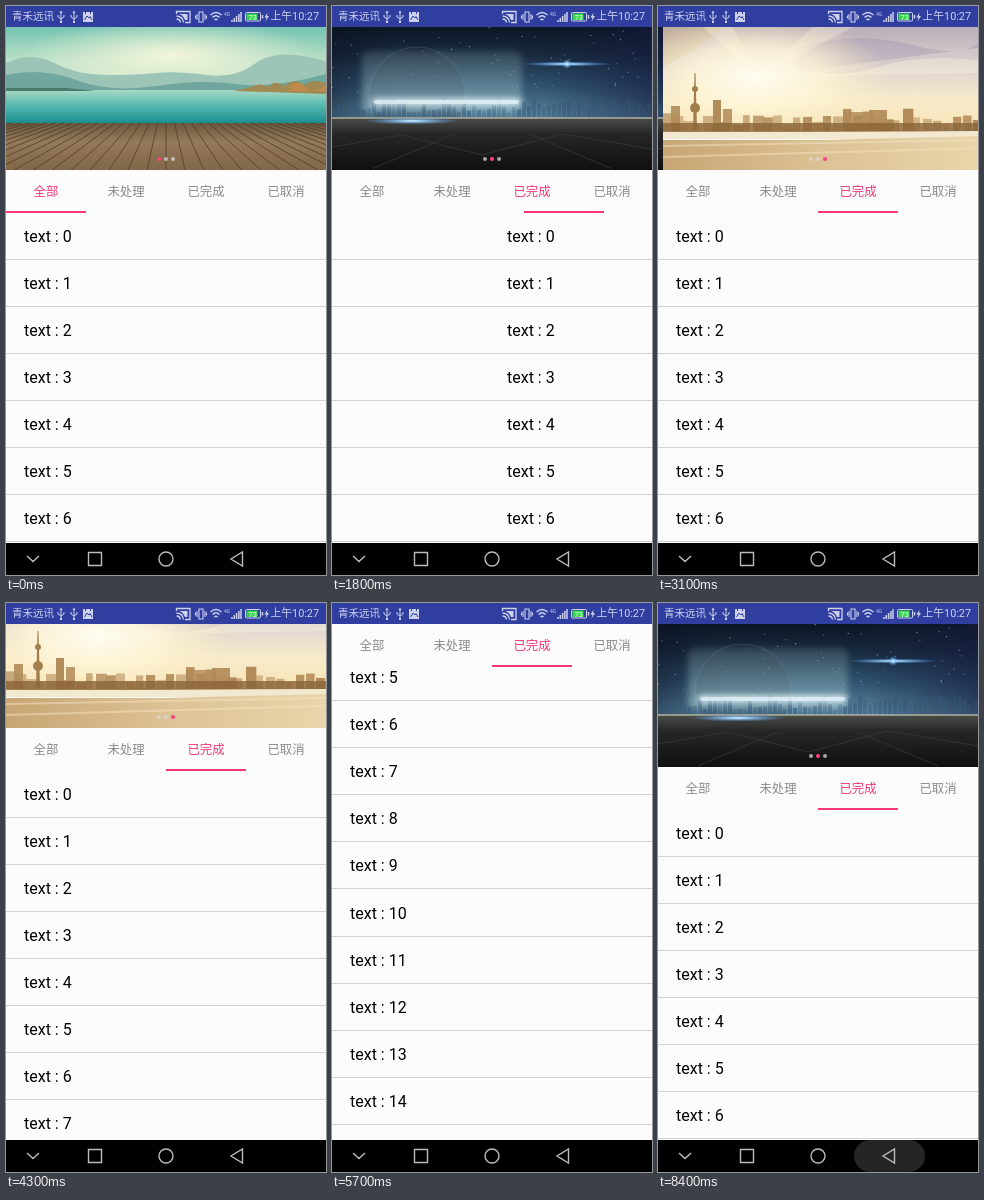
An HTML page that plays this animation: 320 by 569 pixels, repeating every 8.5 s.

```html
<!DOCTYPE html>
<html lang="zh">
<head>
<meta charset="utf-8">
<title>Tabs and banner</title>
<style>
html, body { margin: 0; width: 100%; height: 100%; overflow: hidden; background: #000; }
#stage { position: relative; width: 320px; height: 569px; overflow: hidden; background: #fcfcfc;
  font-family: Roboto, "Noto Sans CJK SC", "Noto Sans CJK", sans-serif; }
#stage div { position: absolute; }
svg { position: absolute; display: block; }
#header { left: 0; top: 21px; width: 320px; height: 186px; z-index: 2; background: #fcfcfc; }
#banner { left: 0; top: 0; width: 320px; height: 143px; overflow: hidden; }
.dot { width: 4px; height: 4px; top: 130px; border-radius: 50%; background: rgba(215,215,215,.75); }
.dot.on { background: #ff4081; }
.tab { top: 143px; width: 80px; height: 43px; line-height: 43px; text-align: center; font-size: 12.4px; color: #8a8a8a; }
.tab.on { color: #f8377b; }
#bar { left: 0; top: 184px; width: 80px; height: 2px; background: #f8377b; }
#pager { left: 0; top: 206px; width: 1280px; height: 480px; }
.page { top: 0; width: 320px; height: 100%; }
.row { left: 0; width: 320px; height: 47px; line-height: 49px; text-indent: 18px;
  font-size: 16px; color: #000; white-space: pre; }
.row::after { content: ""; position: absolute; left: 0; bottom: -1px; width: 100%; height: 1px; background: #d2d2d2; }
#status { left: 0; top: 0; width: 320px; height: 21px; z-index: 3; background: #303f9f; color: #ccd1ee; font-size: 10.8px; line-height: 22px; white-space: nowrap; }
#nav { left: 0; top: 537px; width: 320px; height: 32px; z-index: 3; background: #000; overflow: hidden; }
#ripple { left: 196px; top: 0; width: 71px; height: 32px; border-radius: 16px; background: #252525; }
</style>
</head>
<body>
<div id="stage">
  <div id="pager"></div>

  <div id="header">
    <div id="banner">
      <svg class="slide" width="320" height="143">
        <defs>
          <linearGradient id="sky0" x2="0" y2="1"><stop stop-color="#74c3b2"/><stop offset=".5" stop-color="#b9e0c6"/><stop offset="1" stop-color="#dfeccf"/></linearGradient>
          <linearGradient id="lake" x2="0" y2="1"><stop stop-color="#a9d9c5"/><stop offset=".45" stop-color="#56b9af"/><stop offset="1" stop-color="#178c8f"/></linearGradient>
          <linearGradient id="deck" x2="0" y2="1"><stop stop-color="#6b583e"/><stop offset=".4" stop-color="#94795a"/><stop offset="1" stop-color="#806748"/></linearGradient>
          <radialGradient id="haze"><stop stop-color="#fbf8dc" stop-opacity=".9"/><stop offset="1" stop-color="#fbf8dc" stop-opacity="0"/></radialGradient>
        </defs>
        <rect width="320" height="66" fill="url(#sky0)"/>
        <ellipse cx="165" cy="28" rx="150" ry="36" fill="url(#haze)"/>
        <path d="M0 36Q25 24 48 36T100 48T150 46T200 48T250 36T320 34V64H0Z" fill="#9cc5b8"/>
        <path d="M0 48Q35 40 70 53T150 59T230 57T320 47V65H0Z" fill="#6fa69d"/>
        <rect y="63" width="320" height="34" fill="url(#lake)"/>
        <path d="M0 61H60L90 64H0Z" fill="#48796b"/>
        <path d="M228 64L245 60Q254 55 262 60Q270 52 278 59Q290 50 298 58Q308 51 320 56V67Z" fill="#a08a52"/>
        <path d="M283 60Q292 52 299 60T320 58V64H283Z" fill="#c08a4b"/>
        <rect y="96" width="320" height="47" fill="url(#deck)"/>
        <path id="planks" stroke="#4a3a29" stroke-opacity=".75"/>
      </svg>
      <svg class="slide" width="320" height="143">
        <defs>
          <linearGradient id="sky1" x2="0" y2="1"><stop stop-color="#0c1624"/><stop offset=".3" stop-color="#182a3e"/><stop offset=".65" stop-color="#315470"/><stop offset="1" stop-color="#5f8ca4"/></linearGradient>
          <linearGradient id="dusk"><stop stop-color="#0a1020" stop-opacity=".45"/><stop offset=".2" stop-color="#0a1020" stop-opacity="0"/><stop offset=".65" stop-color="#14193c" stop-opacity="0"/><stop offset="1" stop-color="#14193c" stop-opacity=".6"/></linearGradient>
          <linearGradient id="mist" x2="0" y2="1"><stop stop-color="#7fa0aa" stop-opacity=".25"/><stop offset="1" stop-color="#a4c8d2" stop-opacity=".6"/></linearGradient>
          <linearGradient id="ground" x2="0" y2="1"><stop stop-color="#4b4d49"/><stop offset=".3" stop-color="#272729"/><stop offset="1" stop-color="#0f0f12"/></linearGradient>
          <radialGradient id="flare"><stop stop-color="#fff"/><stop offset=".2" stop-color="#a9dcff" stop-opacity=".9"/><stop offset="1" stop-color="#4a9cff" stop-opacity="0"/></radialGradient>
          <filter id="soft" x="-20%" width="140%" y="-200%" height="500%"><feGaussianBlur stdDeviation="3"/></filter>
        </defs>
        <rect width="320" height="92" fill="url(#sky1)"/>
        <rect width="320" height="92" fill="url(#dusk)"/>
        <g id="stars" fill="#9fb6d0"></g>
        <circle cx="85" cy="68" r="48" fill="#26333f" stroke="#6b7f8c" opacity=".3"/>
        <rect x="30" y="24" width="160" height="62" rx="8" fill="url(#mist)" filter="url(#soft)"/>
        <g id="night" fill="#36587a" opacity=".6"></g>
        <rect x="40" y="72" width="149" height="6" rx="3" fill="#eafaff" filter="url(#soft)"/>
        <rect x="42" y="73" width="145" height="4" rx="2" fill="#eafaff" opacity=".6"/>
        <rect y="91" width="320" height="52" fill="url(#ground)"/>
        <rect y="90" width="320" height="2" fill="#a9aa9a" opacity=".8"/>
        <path d="M0 120L70 108L150 128L230 107L320 122M40 142L120 108M200 108L280 142" fill="none" stroke="#3a3b3a" opacity=".7"/>
        <ellipse cx="80" cy="94" rx="48" ry="3.5" fill="url(#flare)"/>
        <ellipse cx="235" cy="37" rx="46" ry="2.5" fill="url(#flare)"/>
        <circle cx="235" cy="37" r="5" fill="url(#flare)"/>
      </svg>
      <svg class="slide" width="320" height="143">
        <defs>
          <linearGradient id="sky2" x2="0" y2="1"><stop stop-color="#b9adb8"/><stop offset=".35" stop-color="#ddd3d0"/><stop offset=".65" stop-color="#f8ebcb"/><stop offset="1" stop-color="#f7e2b0"/></linearGradient>
          <radialGradient id="sun"><stop stop-color="#fffdf0"/><stop offset=".5" stop-color="#fff6d8" stop-opacity=".8"/><stop offset="1" stop-color="#fff0c4" stop-opacity="0"/></radialGradient>
          <linearGradient id="sand"><stop stop-color="#c8a574"/><stop offset=".5" stop-color="#dcc294"/><stop offset="1" stop-color="#ead5ac"/></linearGradient>
        </defs>
        <rect width="320" height="112" fill="url(#sky2)"/>
        <path d="M0 0H60L30 24L0 40Z" fill="#c9ac78" opacity=".4"/>
        <path d="M130 22Q190 2 250 18T320 8V34Q260 26 215 40T130 40Z" fill="#9f95ae" opacity=".4"/>
        <path d="M95 50L150 0H190ZM95 50L40 0H70ZM95 50L320 20V46Z" fill="#fff8e0" opacity=".3"/>
        <ellipse cx="92" cy="50" rx="135" ry="60" fill="url(#sun)"/>
        <g id="city" fill="#b18a58"></g>
        <path d="M30 103L31.5 46H32.5L34 103Z" fill="#a37e4c"/>
        <circle cx="32" cy="81" r="5" fill="#a37e4c"/><circle cx="32" cy="62" r="3" fill="#a37e4c"/>
        <rect y="96" width="320" height="11" fill="#8a6538" opacity=".8"/>
        <path d="M0 105H140L320 104V112H0Z" fill="#f3e8d0"/>
        <path d="M0 113H160L320 109V143H0Z" fill="url(#sand)"/>
        <path d="M0 119L320 113M0 130L320 121" stroke="#f4e4c0" stroke-opacity=".5" stroke-width="2"/>
      </svg>
      <div class="dot" style="left:151px"></div>
      <div class="dot" style="left:158px"></div>
      <div class="dot" style="left:165px"></div>
    </div>
    <div class="tab" style="left:0">全部</div>
    <div class="tab" style="left:80px">未处理</div>
    <div class="tab" style="left:160px">已完成</div>
    <div class="tab" style="left:240px">已取消</div>
    <div id="bar"></div>
  </div>

  <div id="status">
    <div style="left:6px;font-size:10.5px">青禾远讯</div>
    <div style="left:264.5px">上午10:27</div>
    <svg width="320" height="21" fill="none" stroke="#ccd1ee">
      <g id="usb"><path d="M55 6V15M52 9V11L55 13L58 11V9"/><path d="M53.5 7L55 4.5L56.5 7ZM54 15H56V17H54Z" fill="#ccd1ee" stroke="none"/></g>
      <use href="#usb" x="13"/>
      <path d="M77 6H87V16H77Z" fill="#ccd1ee" stroke="none"/>
      <path d="M78.5 14L81 10L83 12L84 10.5L86 14M79.5 6V8M84.5 6V8" stroke="#303f9f"/>
      <path d="M170.5 8V5.5H184V16.5H179M170.5 10Q177 10.5 177.5 16.5M170.5 13Q174 13 174.5 16.5" stroke-width="1.3"/>
      <path d="M173 8H181.5V14H179Q177 9 173 8Z" fill="#ccd1ee" stroke="none"/>
      <path d="M193 6H197V16H193ZM191 8V14M199 8V14M189.500 9.500V12.500M200.500 9.500V12.500" stroke-width="1.1"/>
      <path d="M204.5 9Q210 4 215.5 9M206.5 11.5Q210 8 213.5 11.5M208.5 14Q210 12.5 211.5 14" stroke-width="1.4"/>
      <path d="M226 16V14M228.3 16V12M230.6 16V10M232.9 16V8M235 16V6" stroke-width="1.5"/>
      <rect x="239.5" y="6.5" width="15" height="8.5" rx="1"/>
      <rect x="240.5" y="7.5" width="11" height="6.5" fill="#35d84a" stroke="none"/>
      <path d="M256.5 9V12.5" stroke-width="1.5"/>
      <path d="M261.5 6.5L258.5 11.5H260.5L259.5 15.5L263 10H261Z" fill="#ccd1ee" stroke="none"/>
      <text x="218" y="10" font-size="5" fill="#ccd1ee" stroke="none">4G</text>
      <text x="242.5" y="13.5" font-size="7.5" fill="#fff" stroke="none">73</text>
    </svg>
  </div>

  <div id="nav">
    <div id="ripple"></div>
    <svg width="320" height="32" fill="none" stroke="#bcbcbc" stroke-width="1.4">
      <path d="M21 13L27 18.5L33 13M82.5 9.5H95.500V22.500H82.500ZM236.500 9V23L225 16Z"/>
      <circle cx="160" cy="16" r="7"/>
    </svg>
  </div>
</div>
<script>
const LOOP = 8500, TICK = 100, ROW = 47.1, HIDE = 143;
const $ = id => document.getElementById(id);
const all = sel => [...document.querySelectorAll(sel)];
const slides = all('.slide'), dots = all('.dot'), tabs = all('.tab');

// start, release, end, from page, to page
const swipes = [[350, 530, 950, 0, 1], [1230, 1380, 1650, 1, 2], [1650, 1801, 2200, 2, 3], [2340, 2490, 2900, 3, 2]];
// start, end, from, to
const scrolls = [[4240, 4900, 0, 224], [5440, 5900, 224, 430], [6440, 6800, 430, 611], [6940, 7400, 611, 0]];
const turns = [615, 2648, 4680, 6712];

const clamp = x => Math.min(1, Math.max(0, x));
const out = (x, n) => 1 - (1 - clamp(x)) ** n;
const move = (el, x, y) => { el.style.transform = `translate(${x}px,${y}px)`; };

function pageAt(t) {
  const s = swipes.filter(w => t >= w[0]).pop();
  if (!s) return 0;
  const [start, release, end, from, to] = s, held = .515;
  const part = t < release
    ? held * ((t - start) / (release - start)) ** 1.5
    : held + (1 - held) * out((t - release) / (end - release), 5);
  return from + (to - from) * part;
}

function scrollAt(t) {
  const s = scrolls.filter(w => t >= w[0]).pop();
  if (!s) return 0;
  const [start, end, from, to] = s;
  return Math.round(from + (to - from) * out((t - start) / (end - start), 2));
}

function draw(t) {
  const turn = turns.reduce((sum, s) => sum + out((t - s) / 800, 5), 0);
  slides.forEach((el, i) => move(el, Math.round(((i - turn + 4) % 3 + 3) % 3 * 320 - 320), 0));
  const slide = turns.filter(s => t >= s).length % 3;
  dots.forEach((el, i) => el.classList.toggle('on', i === slide));

  const released = swipes.filter(w => t >= w[1]).pop();
  const tab = released ? released[4] : 0;
  tabs.forEach((el, i) => el.classList.toggle('on', i === tab));
  // the bar trails the page by about one layout pass
  move($('bar'), Math.round(pageAt(t - 23) * 80), 0);

  const y = scrollAt(t), hidden = Math.min(y, HIDE);
  move($('header'), 0, -hidden);
  move($('pager'), -Math.round(pageAt(t) * 320), -hidden);
  move(pages[2], 0, hidden - y);

  const press = t >= 8400 ? 1 : t >= 8300 ? .6 : 0;
  $('ripple').style.opacity = press;
  $('ripple').style.transform = `scaleX(${press})`;
}

function add(parent, cls, style, text = '') {
  const el = document.createElement('div');
  el.className = cls;
  el.style.cssText = style;
  el.textContent = text;
  parent.append(el);
  return el;
}

const pages = [0, 1, 2, 3].map(p => {
  const page = add($('pager'), 'page', `left:${p * 320}px`);
  for (let i = 0; i < 20; i++) add(page, 'row', `top:${Math.floor(i * ROW)}px`, `text : ${i}`);
  return page;
});

let seed = 7;
const rand = () => (seed = seed * 16807 % 2147483647) / 2147483647;
const rect = (x, y, w, h) => `<rect x="${x}" y="${y}" width="${w}" height="${h}" opacity="${.5 + rand() * .5}"/>`;
const many = (n, f) => Array.from({ length: n }, (_, i) => f(i)).join('');

$('planks').setAttribute('d', many(41, i => `M${160 + (i - 20) * 8.5} 96L${160 + (i - 20) * 19} 143`));
$('stars').innerHTML = many(60, () => rect(rand() * 320, rand() * 65, 1, 1));
$('night').innerHTML = many(64, i => { const h = 4 + rand() * 15; return rect(i * 5, 90 - h, 4, h); });
$('city').innerHTML = many(32, i => {
  const h = (i > 17 && i < 26 ? 10 : 6) + rand() * 13;
  return rect(i * 10, 104 - h, 6 + rand() * 5, h);
}) + rect(8, 79, 9, 25) + rect(50, 73, 8, 31) + rect(60, 82, 9, 22) + rect(180, 85, 20, 19) + rect(206, 83, 18, 21);

function frame(now) {
  draw(Math.floor(now % LOOP / TICK) * TICK);
  requestAnimationFrame(frame);
}
draw(0);
requestAnimationFrame(frame);
</script>
</body>
</html>
```
